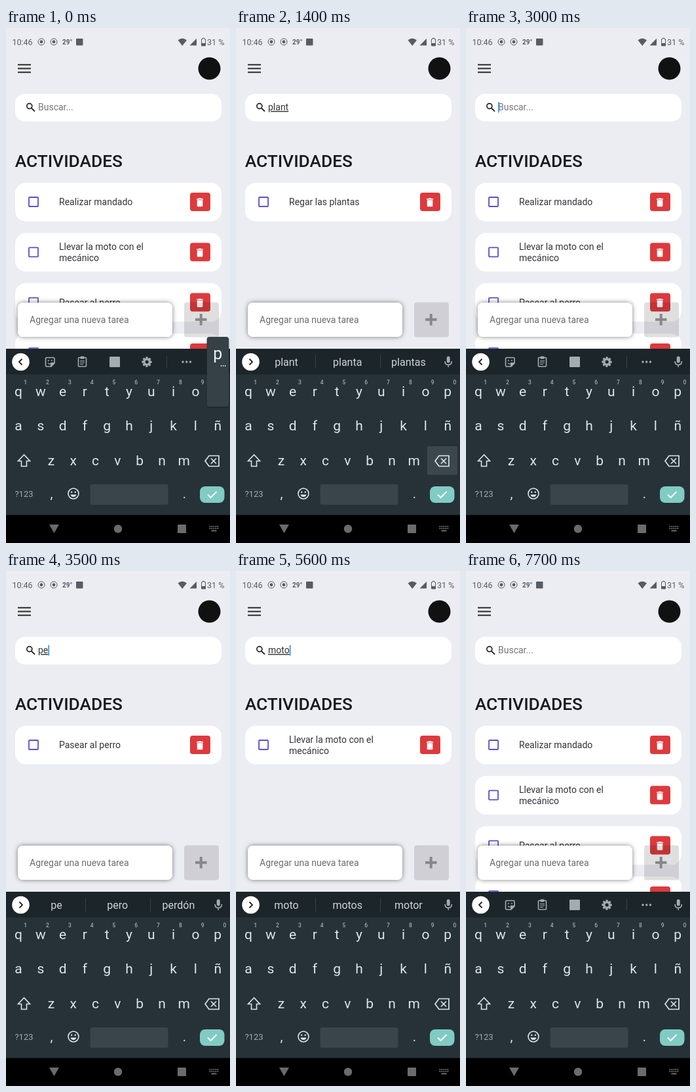
These frames come from a looping animation (342x782 px, 8 s). An HTML page:

```html
<!DOCTYPE html>
<html lang="es">
<head>
<meta charset="utf-8">
<style>
html, body { margin: 0; height: 100%; overflow: hidden; background: #ecedf3; }
svg { display: block; width: 100vw; height: 100vh; font-family: Roboto, sans-serif; }
</style>
</head>
<body>
<svg id="stage" viewBox="0 0 342 782"></svg>
<script>
const LOOP = 8000;
const tasks = ['Realizar mandado', 'Llevar la moto con el|mecánico', 'Pasear al perro',
  'Regar las plantas', 'Comprar la ropa'];
const rows = ['qwertyuiop', 'asdfghjklñ', ' zxcvbnm'];
const hints = {
  p: 'p para por', pl: 'pl plan plaza', pla: 'pla plan playa', plan: 'plan planta planes',
  plant: 'plant planta plantas', pe: 'pe pero perdón', m: 'm me mi',
  mo: 'mo moto modo', mot: 'mot moto motos', moto: 'moto motos motor'
};
// time, typed text, pressed key ('<' is backspace), caret
const steps = [
  [0, '', 'p', 0], [100, 'p', '', 1], [200, 'p', 'l', 1], [300, 'pla', '', 1],
  [400, 'pla', 'n', 1], [500, 'plan', 't', 1], [600, 'plant', '', 1], [700, 'plant', '', 0],
  [1400, 'plant', '<', 0], [1500, 'plan', '<', 1], [1600, 'plan', '', 0],
  [2000, 'plan', '<', 0], [2100, 'pla', '<', 1], [2200, 'pla', '', 1], [2300, 'pl', '<', 1],
  [2400, 'pl', '', 1], [2500, 'p', '<', 1], [2600, '', '<', 1], [2700, '', '', 0],
  [3000, '', '', 1], [3100, '', 'p', 1], [3200, 'p', '', 1], [3300, 'p', 'e', 1],
  [3400, 'pe', 'e', 1], [3500, 'pe', '', 1], [3600, 'pe', '', 0],
  [4000, 'pe', '<', 0], [4200, 'p', '<', 1], [4300, 'p', '', 1], [4500, 'p', '<', 1],
  [4600, '', '<', 1], [4700, '', '', 0],
  [5300, '', 'm', 0], [5400, 'm', 'o', 1], [5500, 'mo', 't', 1], [5600, 'moto', '', 1],
  [5700, 'moto', '', 0], [6000, 'moto', '<', 0], [6100, 'mot', '<', 1], [6200, 'mot', '', 1],
  [6300, 'mo', '<', 1], [6400, 'mo', '', 1], [6500, 'm', '', 1], [6700, 'm', '<', 1],
  [6800, '', '<', 1], [6900, '', '', 1], [7000, '', '', 0], [7400, '', '', 1], [7700, '', '', 0]
];

const rect = (x, y, w, h, fill, r = 0, more = '') =>
  `<rect x="${x}" y="${y}" width="${w}" height="${h}" rx="${r}" fill="${fill}" ${more}/>`;
const circle = (x, y, r, fill, more = '') => `<circle cx="${x}" cy="${y}" r="${r}" fill="${fill}" ${more}/>`;
const path = (d, fill, more = '') => `<path d="${d}" fill="${fill}" ${more}/>`;
const line = (d, color, w = 2, more = '') => path(d, 'none', `stroke="${color}" stroke-width="${w}" ${more}`);
const text = (s, x, y, size, fill, more = '') =>
  `<text x="${x}" y="${y}" font-size="${size}" fill="${fill}" ${more}>${s}</text>`;
const mid = (s, x, y, size, fill, more = '') => text(s, x, y, size, fill, 'text-anchor="middle" ' + more);

const INK = '#dfe4e6', DIM = '#a3acb0', STATUS = '#575b64';
const keyX = i => 19 + i * 33.8;
const keyY = r => 552 + r * 52.3;

function statusBar() {
  const radio = x => circle(x, 21, 5, 'none', `stroke="${STATUS}"`) + circle(x, 21, 2.4, STATUS);
  return text('10:46', 9.5, 26, 12.5, STATUS) + radio(54) + radio(73) +
    text('29°', 86, 25, 10, STATUS, 'font-weight="700"') + rect(107, 16, 10.5, 10.5, STATUS, 1) +
    path('M262.5 18.5Q269 13 276 18.5L269.2 27Z', STATUS) + path('M280.5 26.5L291 16V26.5Z', STATUS) +
    path('M298.5 17H300V15.5H303V17H304.5V27H298.5Z', 'none', `stroke="${STATUS}"`) +
    rect(299, 23, 5, 4, STATUS) + text('31 %', 307, 26, 12.5, STATUS);
}

function header() {
  return line('M18 55.7H38M18 61.5H38M18 67.3H38', '#2b2c31', 2.1) + circle(310.5, 61.5, 17, '#111') +
    rect(14, 100, 315, 42, '#fff', 15) +
    circle(35.8, 118.6, 4, 'none', 'stroke="#222" stroke-width="1.7"') + line('M38.8 121.6L44 126.6', '#222', 2) +
    text('ACTIVIDADES', 13.7, 211, 26.3, '#17181c', 'font-weight="500"');
}

function card(task, i) {
  const y = 235 + i * 76.3, c = y + 29, lines = task.split('|');
  return rect(14, y, 315, 58.5, '#fff', 16) +
    rect(35, c - 7, 14, 14, 'none', 1, 'stroke="#5b50cb" stroke-width="1.8"') +
    lines.map((s, k) => text(s, 81, c + 5 + k * 17 - (lines.length - 1) * 8.5, 14, '#34353a')).join('') +
    rect(281, c - 14, 31, 28, '#dc3a3d', 4) +
    path('M6 19c0 1.1.9 2 2 2h8c1.1 0 2-.9 2-2V7H6zM19 4h-3.5l-1-1h-5l-1 1H5v2h14z', '#fff',
      `transform="translate(287.4 ${c - 7.8}) scale(.72)"`);
}

function addBar() {
  return rect(18, 417, 236, 52, '#fff', 8, 'filter="url(#shade)"') +
    text('Agregar una nueva tarea', 36, 448, 14, '#6c6c70') +
    rect(272, 416.5, 53, 53, '#000', 4, 'opacity=".125"') +
    line('M289 442.7H306.5M297.7 434V451.5', '#87878b', 4);
}

function tools() {
  const gear = Array.from({ length: 8 }, (_, i) =>
    rect(213.4, 499.3, 3.4, 4, DIM, 0.6, `transform="rotate(${i * 45} 215 507)"`)).join('');
  return line('M24.5 502.5L20 507L24.5 511.5', '#222', 1.8) +
    line('M62 500.5H72.5Q74 500.5 74 502V509L69 514H62Q60.500 514 60.500 512.500V502Q60.500 500.500 62 500.500Z', DIM, 1.6) +
    path('M74 508V509L69 514H68V508Z', DIM) +
    circle(64.8, 505, 1, DIM) + circle(69.8, 505, 1, DIM) + line('M64 508.500Q65.500 511 68 510', DIM, 1.300) +
    rect(110.5, 500.5, 12, 13.5, 'none', 1, `stroke="${DIM}" stroke-width="1.6"`) +
    rect(113.5, 498.5, 6, 4, DIM, 1) + line('M113 505.500H120M113 508H120M113 510.500H118', DIM, 1.2) +
    rect(158, 499, 16, 16, DIM, 1) +
    gear + circle(215.1, 507, 4.2, 'none', `stroke="${DIM}" stroke-width="3.2"`) +
    line('M245.500 498V516', '#38444a', 1) + [270, 275.7, 281.4].map(x => circle(x, 507, 1.7, DIM)).join('');
}

function suggestions(typed) {
  return line('M20.500 502.500L25 507L20.500 511.500', '#222', 1.8) +
    hints[typed].split(' ').map((s, i) => mid(s, 77 + i * 93.2, 513, 16, '#cfd5d8')).join('') +
    line('M121.500 497V517M220.500 497V517', '#38444a', 1);
}

function keyboard(typed, key) {
  let s = rect(0, 487, 342, 39, '#1c2529') + rect(0, 526, 342, 214, '#263238') + rect(0, 739.5, 342, 43, '#000') +
    circle(22.5, 507, 13.3, '#fff') + (typed ? suggestions(typed) : tools()) +
    rect(321.700, 498.500, 5, 10, DIM, 2.5) + line('M319 506Q319 511.500 324.200 511.500T329.400 506M324.200 511.500V515', DIM, 1.600);
  if (key === '<') s += rect(292, 635, 46, 43.5, '#3b474d', 2);
  rows.forEach((row, r) => [...row].forEach((ch, i) => {
    const x = keyX(i + (r === 2 ? 0.48 : 0));
    if (ch !== ' ') s += mid(ch, r === 2 ? keyX(i + 0.48 - 0.0) - 0 : x, keyY(r) + 7, 21, INK);
    if (!r) s += mid((i + 1) % 10, x + 10.7, 541, 8.5, DIM, 'font-weight="500"');
  }));
  s += line('M27.500 648L18.500 657.500H23.500V665.500H31.500V657.500H36.500Z', INK, 1.6) +
    line('M304 657.500L310 649.500H325V665.500H310ZM313 653.500L321 661.500M321 653.500L313 661.500', INK, 1.7) +
    mid('?123', 27.5, 712, 13, DIM) + mid(',', 69.5, 714, 20, INK) + mid('.', 272.5, 714, 20, INK) +
    circle(103, 707, 8, 'none', `stroke="${INK}" stroke-width="1.6"`) +
    circle(100.2, 704.8, 1.2, INK) + circle(105.8, 704.8, 1.2, INK) + path('M98.500 708.500H107.500Q106.500 712 103 712T98.500 708.500Z', INK) +
    rect(128.5, 693, 119, 31, '#3a454b', 3) + rect(296, 696, 37.5, 25, '#80cbc4', 8) +
    line('M308 708.500L312.500 713L321.500 704', '#fff', 2) +
    path('M66 754H81L73.500 767Z', '#6b6b6b') + circle(171, 760.5, 6.2, '#6b6b6b') + rect(262, 754, 13, 13, '#6b6b6b', 1);
  for (let i = 0; i < 10; i++) s += rect(310.5 + (i % 5) * 3, 756 + (i > 4) * 3, 1.8, 1.8, '#777');
  return s + rect(313.5, 762.500, 8, 1.8, '#777');
}

function popup(key) {
  const r = rows.findIndex(row => row.includes(key));
  const x = keyX(rows[r].indexOf(key) - (r === 2 ? 0.52 - 1 : 0) + 0);
  const y = keyY(r) - 83;
  return rect(x - 16.5, y, 33.5, 106, '#343f46', 4, 'filter="url(#drop)"') + mid(key, x, y + 34, 25, '#eef1f2') +
    (r === 0 ? [0, 3, 6].map(d => circle(x + 5.5 + d, y + 44, 0.9, INK)).join('') : '');
}

const stage = document.getElementById('stage');
const defs = `<defs>
  <filter id="shade" x="-10%" y="-30%" width="120%" height="160%"><feDropShadow dx="0" dy="0" stdDeviation="3.5" flood-opacity=".5"/></filter>
  <filter id="drop" x="-20%" y="-10%" width="140%" height="120%"><feDropShadow dx="0" dy="1" stdDeviation="1" flood-opacity=".4"/></filter>
</defs>`;

function draw([, typed, key, caret]) {
  const found = tasks.filter(t => t.toLowerCase().includes(typed));
  const field = typed
    ? text(typed, 49, 125, 14, '#333', 'id="typed" text-decoration="underline"')
    : text('Buscar...', 49, 125, 14, '#77777b');
  stage.innerHTML = defs + rect(0, 0, 342, 782, '#ecedf3') + statusBar() + header() + field +
    found.slice(0, 4).map(card).join('') + addBar() + keyboard(typed, key) +
    (key && key !== '<' ? popup(key) : '');
  if (caret) {
    const width = typed ? document.getElementById('typed').getComputedTextLength() : 0;
    stage.insertAdjacentHTML('beforeend', rect(49 + width, 112.5, 1.8, 16, '#3a9be0'));
  }
}

let shown;
function tick(now) {
  const t = now % LOOP;
  const step = steps.findLast(s => s[0] <= t);
  if (step !== shown) draw(shown = step);
  requestAnimationFrame(tick);
}
tick(performance.now());
</script>
</body>
</html>
```
